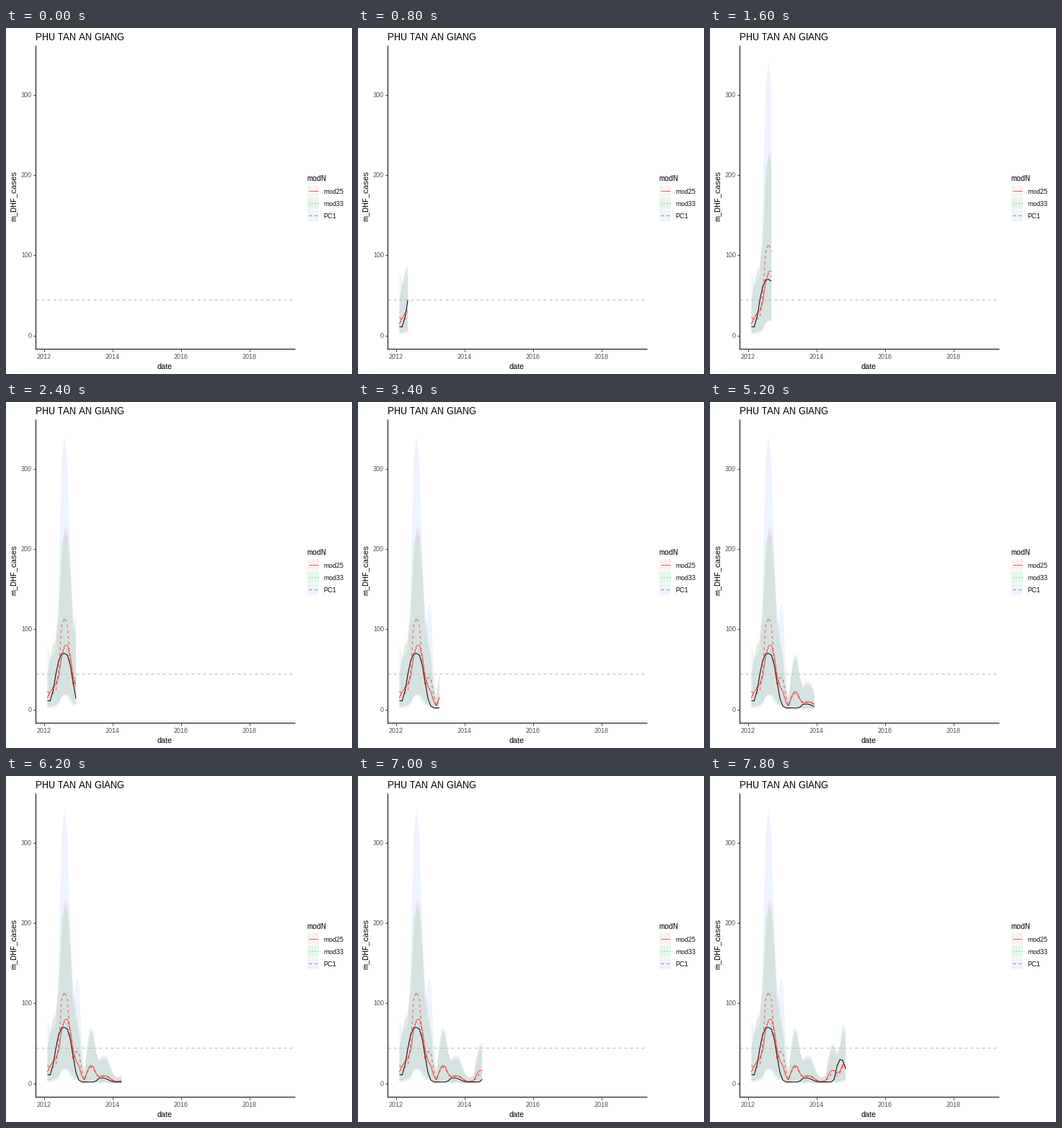
These frames come from a looping animation (480 px wide and 480 px high, 8 s). A matplotlib script:

```python
import numpy as np
import matplotlib.pyplot as plt
from matplotlib.animation import FuncAnimation
from matplotlib.patches import Polygon, Rectangle

SIZE, DPI = 480, 100
FRAMES, INTERVAL = 40, 200
PX = 72 / DPI  # points per pixel

plt.rcParams.update({
    "font.family": ["Liberation Sans", "DejaVu Sans"],
    "text.hinting": "native",
    "text.hinting_factor": 1,
})

fig = plt.figure(figsize=(SIZE / DPI, SIZE / DPI), dpi=DPI, facecolor="white")
ax = fig.add_axes([0, 0, 1, 1])
ax.set(xlim=(0, SIZE), ylim=(SIZE, 0))
ax.axis("off")


def days_since_2012(date):
    date = np.asarray(date, dtype="datetime64[D]")
    return (date - np.datetime64("2012-01-01")).astype(int)


def to_x(days):
    return 53.4 + 0.13025 * days


def to_y(value):
    return 427.2 - 1.1133 * np.asarray(value)


days = days_since_2012(np.arange("2012-02", "2014-12", dtype="datetime64[M]"))
month = np.arange(len(days))


def wave(peak, rise, fall):
    """Rounded seasonal wave of height 1; all arguments in months."""
    width = np.where(month < peak, rise, fall)
    return np.exp(-np.abs((month - peak) / width) ** 3)


def season(base, heights, waves):
    return base + sum(h * wave(*w) for h, w in zip(heights, waves))


def model_waves(peak, fall):
    return [(0, 0.9, 0.9), (2.4, 1.9, 1.7), (peak, peak - 4, fall),
            (10.5, 1.5, 1.5), (15.3, 1.7, 1.8), (19.8, 2.6, 2.6),
            (28.5, 1.8, 2.2), (32.2, 1.3, 1.5)]


SOLID, DOTTED, DASHED = "-", (0, (1, 3)), (0, (4, 4))
RED = (1, 0, 0, 0.65)


class Model:
    def __init__(self, name, fill, style, shape, mean, high, low_scale):
        self.name, self.fill, self.style = name, fill, style
        waves = model_waves(*shape)
        self.mean = season(3, mean, waves)
        self.high = season(8, high, waves)
        self.low = low_scale * self.high ** 1.23


MODELS = [
    Model("mod25", "#F8766D", SOLID, (6.6, 2.5),
          [9, 25, 78, 20, 20, 7, 14, 21],
          [28, 72, 222, 58, 55, 26, 40, 62], 0.0245),
    Model("mod33", "#00BA38", DOTTED, (5.9, 3.2),
          [8, 25, 74, 20, 19, 7, 14, 20],
          [26, 74, 216, 58, 62, 23, 42, 68], 0.0245),
    Model("PC1", "#619CFF", DASHED, (5.9, 2.4),
          [18, 18, 112, 38, 18, 7, 9, 19],
          [66, 60, 335, 126, 58, 28, 34, 58], 0.0143),
]

cases = season(2.5, [8, 68, 5, 28],
               [(0, 0.9, 0.9), (5.9, 3.7, 3.4), (18.8, 1.5, 3),
                (31.2, 1.7, 2.2)])


def line(xs, ys, color="black", style=SOLID, z=3):
    return ax.plot(xs, ys, color=color, ls=style, lw=PX, zorder=z,
                   dash_capstyle="butt", solid_capstyle="butt")[0]


def text(x, y, label, size, color="black", **kw):
    kw.setdefault("va", "baseline")
    ax.text(x, y, label, fontsize=size * PX, color=color, zorder=6, **kw)


def draw_axes():
    line([41, 41], [24, 446], z=5)
    line([41, 401], [445, 445], z=5)
    for value in (0, 100, 200, 300):
        y = np.floor(to_y(value))
        line([38, 41], [y, y], "#333333", z=5)
        text(36, y + 3, str(value), 9, "#4D4D4D", ha="right")
    for year in (2012, 2014, 2016, 2018):
        x = np.floor(to_x(days_since_2012(f"{year}-01-01")))
        line([x, x], [446, 449], "#333333", z=5)
        text(x, 459, str(year), 9, "#4D4D4D", ha="center")
    text(41, 17, "PHU TAN AN GIANG", 13)
    text(220.5, 473, "date", 11, ha="center")
    text(15.5, 233.5, "m_DHF_cases", 11, ha="right", va="center",
         rotation=90, rotation_mode="default")
    line([41, 401], [377, 377], "#b8b8b8", DASHED, z=2)


def draw_legend():
    text(417.5, 212, "modN", 11)
    for i, model in enumerate(MODELS):
        top = 218 + 17.2 * i
        mid = np.floor(top + 8)
        ax.add_patch(Rectangle((418, top), 16, 16, fc=model.fill,
                               alpha=0.1, lw=0))
        color = "#7f8f80" if model.style == DOTTED else RED
        line([420, 433], [mid, mid], color, model.style)
        text(440.5, mid + 4, model.name, 9)


draw_axes()
draw_legend()

bands, means = [], []
for model in MODELS:
    band = Polygon(np.zeros((3, 2)), closed=True, fc=model.fill, alpha=0.1,
                   lw=0, zorder=1)
    bands.append(ax.add_patch(band))
    means.append(line([], [], RED, model.style, z=4))
case_line = line([], [], z=3)

# Each month lands on its nearest frame; frames in between are interpolated
span = days_since_2012("2019-01-01") - days[0]
arrival = np.round((days - days[0]) * 99 / span)


def update(n):
    head = np.interp(n, arrival, days)
    t = np.append(days[days < head], head)
    x = to_x(t)

    def curve(values):
        return to_y(np.interp(t, days, values))

    for band, mean, model in zip(bands, means, MODELS):
        outline = np.r_[curve(model.high), curve(model.low)[::-1]]
        band.set_xy(np.column_stack([np.r_[x, x[::-1]], outline]))
        mean.set_data(x, curve(model.mean))
    case_line.set_data(x, curve(cases))

    artists = [*bands, *means, case_line]
    for artist in artists:
        artist.set_visible(len(t) > 1)
    return artists


anim = FuncAnimation(fig, update, frames=FRAMES, interval=INTERVAL,
                     repeat=True, repeat_delay=0, blit=False)
plt.show()
```
